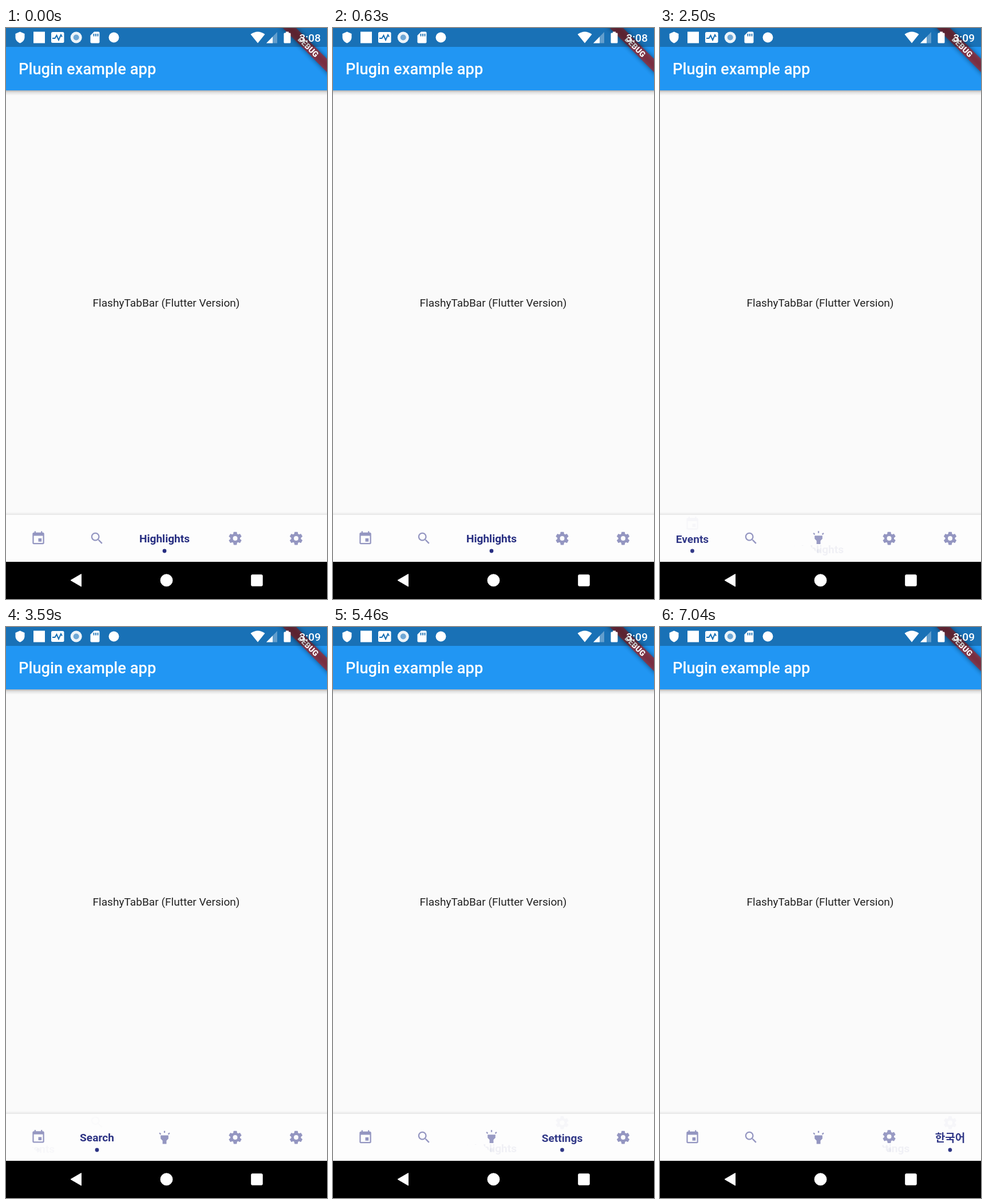
These frames come from a looping animation (561x998 px, 7080 ms). An HTML page:

```html
<!DOCTYPE html>
<html lang="en">
<head>
<meta charset="utf-8">
<title>Tab bar demo</title>
<style>
  html, body { margin: 0; width: 100%; height: 100%; overflow: hidden; background: #fafafa; }
  svg { display: block; width: 100%; height: 100%; }
  text { font-family: Roboto, "Noto Sans CJK KR", "Noto Sans CJK", sans-serif; }
  .mid { text-anchor: middle; }
  .tab { --p: 0; }
  .icon {
    fill: #9496c1; stroke: none;
    opacity: calc(1 - var(--p));
    transform: translateY(calc(var(--p) * -27px));
  }
  .label {
    font-size: 19.1px; font-weight: 700; fill: #272e81; text-anchor: middle;
    opacity: var(--p);
    transform: translateY(calc((1 - var(--p)) * 21px));
  }
  .dot { fill: #272e81; opacity: var(--p); }
  .bar, .cover { fill: #fdfdfd; }
</style>
</head>
<body>
<svg viewBox="0 0 561 998">
  <defs>
    <linearGradient id="drop" x2="0" y2="1">
      <stop offset="0" stop-opacity=".28"/>
      <stop offset=".4" stop-opacity=".1"/>
      <stop offset="1" stop-opacity="0"/>
    </linearGradient>
    <linearGradient id="rise" x2="0" y2="1">
      <stop offset="0" stop-opacity="0"/>
      <stop offset="1" stop-opacity=".08"/>
    </linearGradient>
    <filter id="soft" x="-20%" y="-100%" width="140%" height="300%">
      <feGaussianBlur stdDeviation="4"/>
    </filter>

    <path id="event" d="M17 12h-5v5h5v-5zM16 1v2H8V1H6v2H5c-1.11 0-1.99.9-1.99 2L3 19c0 1.1.89 2 2 2h14c1.1 0 2-.9 2-2V5c0-1.1-.9-2-2-2h-1V1h-2zm3 18H5V8h14v11z"/>
    <path id="search" d="M15.5 14h-.79l-.28-.27C15.41 12.59 16 11.11 16 9.5 16 5.91 13.09 3 9.5 3S3 5.91 3 9.5 5.91 16 9.5 16c1.61 0 3.09-.59 4.23-1.57l.27.28v.79l5 4.99L20.49 19l-4.99-5zm-6 0C7.01 14 5 11.99 5 9.5S7.01 5 9.5 5 14 7.01 14 9.5 11.99 14 9.5 14z"/>
    <path id="torch" d="M6 14l3 3v5h6v-5l3-3V9H6zM11 2h2v3h-2zM3.5 5.9L4.9 4.5 7 6.6 5.6 8zM17 6.6l2.1-2.1 1.4 1.4L18.4 8z"/>
    <path id="tooth" d="M-2 -10H2Q2.4 -10 2.5 -9.5L3.1 -6H-3.1L-2.5 -9.5Q-2.4 -10 -2 -10z"/>
    <g id="gear" transform="translate(12 12)">
      <circle r="5.5" fill="none" stroke="#9496c1" stroke-width="4"/>
      <use href="#tooth"/>
      <use href="#tooth" transform="rotate(60)"/>
      <use href="#tooth" transform="rotate(120)"/>
      <use href="#tooth" transform="rotate(180)"/>
      <use href="#tooth" transform="rotate(240)"/>
      <use href="#tooth" transform="rotate(300)"/>
    </g>
  </defs>

  <rect width="561" height="998" fill="#fafafa"/>
  <text class="mid" x="280" y="486.5" font-size="19.1" fill="#212121">FlashyTabBar (Flutter Version)</text>

  <!-- app bar -->
  <rect y="109" width="561" height="9" fill="url(#drop)"/>
  <rect width="561" height="109" fill="#2196f3"/>
  <text x="22" y="81" font-size="27.3" font-weight="500" fill="#fff">Plugin example app</text>

  <!-- corner ribbon -->
  <g transform="translate(561 0) rotate(45)">
    <rect x="-64" y="38.2" width="128" height="16.4" opacity=".5" filter="url(#soft)"/>
    <rect x="-64" y="38.2" width="128" height="16.4" fill="#b71c1c" fill-opacity=".63"/>
    <text class="mid" y="51.4" font-size="13.9" font-weight="900" fill="#fff">DEBUG</text>
  </g>

  <!-- status bar -->
  <rect width="561" height="33" fill-opacity=".25"/>
  <g fill="#fff">
    <path d="M24.500 6.500l8 3.500v6c0 5-3.400 8.800-8 10.500c-4.600-1.700-8-5.500-8-10.500v-6z"/>
    <rect x="48" y="6.500" width="20" height="20"/>
    <rect x="79" y="7" width="22.500" height="19" rx="2.500"/>
    <path d="M81 18h4.500l3-5 3.500 8 4-9 2 3.500" fill="none" stroke="#1971b6" stroke-width="2"/>
    <circle cx="122.700" cy="16.500" r="10" fill-opacity=".92"/>
    <circle cx="122.700" cy="16.500" r="5" fill="#6fa8d6"/>
    <path d="M154 6.500h7.500q2 0 2 2v16q0 2-2 2h-12q-2 0-2-2V13z"/>
    <path d="M153.500 10v4.500M157 10v4.500M160.500 10v4.500" stroke="#1971b6" stroke-width="1.800"/>
    <circle cx="188.500" cy="16.500" r="9"/>
    <path d="M440 26.500L427.500 11Q440 2 452.500 11z"/>
    <path d="M455 26.500L474 7v19.500z" fill-opacity=".32"/>
    <path d="M455 26.500L466 15.200v11.300z"/>
    <path d="M489 6.500h5v2h2q1.500 0 1.500 1.500v15q0 1.500-1.500 1.500h-9q-1.500 0-1.500-1.500V10q0-1.500 1.500-1.500h2z"/>
    <text id="clock" x="550" y="23.500" font-size="19.1" font-weight="500" text-anchor="end">3:08</text>
  </g>

  <!-- tab bar -->
  <rect y="846" width="561" height="5" fill="url(#rise)"/>
  <rect class="bar" y="851" width="561" height="82"/>
  <g id="tabs"></g>

  <!-- navigation bar -->
  <rect y="933" width="561" height="65"/>
  <g fill="#fff" stroke="#fff" stroke-linejoin="round">
    <path d="M113 965.300L131.500 954.500v21.600z"/>
    <circle cx="280.500" cy="965.300" r="10.500"/>
    <rect x="428.700" y="955.700" width="19.500" height="19.500" rx="1.500"/>
  </g>
</svg>

<script>
  const LOOP = 7080, FADE = 170, MINUTE = 1000;
  const tabs = [
    { x: 56.5, icon: 'event', label: 'Events' },
    { x: 159, icon: 'search', label: 'Search' },
    { x: 277, icon: 'torch', label: 'Highlights' },
    { x: 400.5, icon: 'gear', label: 'Settings' },
    { x: 507, icon: 'gear', label: '한국어' }
  ];
  // start time and tab of each selection
  const taps = [[-FADE, 2], [2340, 0], [3425, 1], [4360, 2], [5300, 3], [6880, 4]];

  const row = document.getElementById('tabs');
  const clock = document.getElementById('clock');

  // the slanted cover wipes labels that sink below the centre line
  row.innerHTML = tabs.map(({ x, icon, label }) => `
    <g class="tab">
      <g class="icon"><use href="#${icon}" transform="translate(${x - 13.6} 878.4) scale(1.136)"/></g>
      <text class="label" x="${x}" y="898.5">${label}</text>
      <path class="cover" d="M${x - 15} 905h-27l-27 27h81z"/>
      <circle class="dot" cx="${x}" cy="914" r="3.4"/>
    </g>`).join('');
  const groups = [...row.children];

  function draw(t) {
    const k = taps.findLastIndex(([start]) => start <= t);
    const [start, current] = taps[k];
    const previous = k ? taps[k - 1][1] : -1;
    const f = Math.min((t - start) / FADE, 1);
    groups.forEach((g, i) => {
      const p = i === current ? f : i === previous ? 1 - f : 0;
      g.style.setProperty('--p', p);
    });
    clock.textContent = t < MINUTE ? '3:08' : '3:09';
  }

  const begin = performance.now();
  function tick() {
    draw((performance.now() - begin) % LOOP);
    requestAnimationFrame(tick);
  }
  tick();
</script>
</body>
</html>
```
